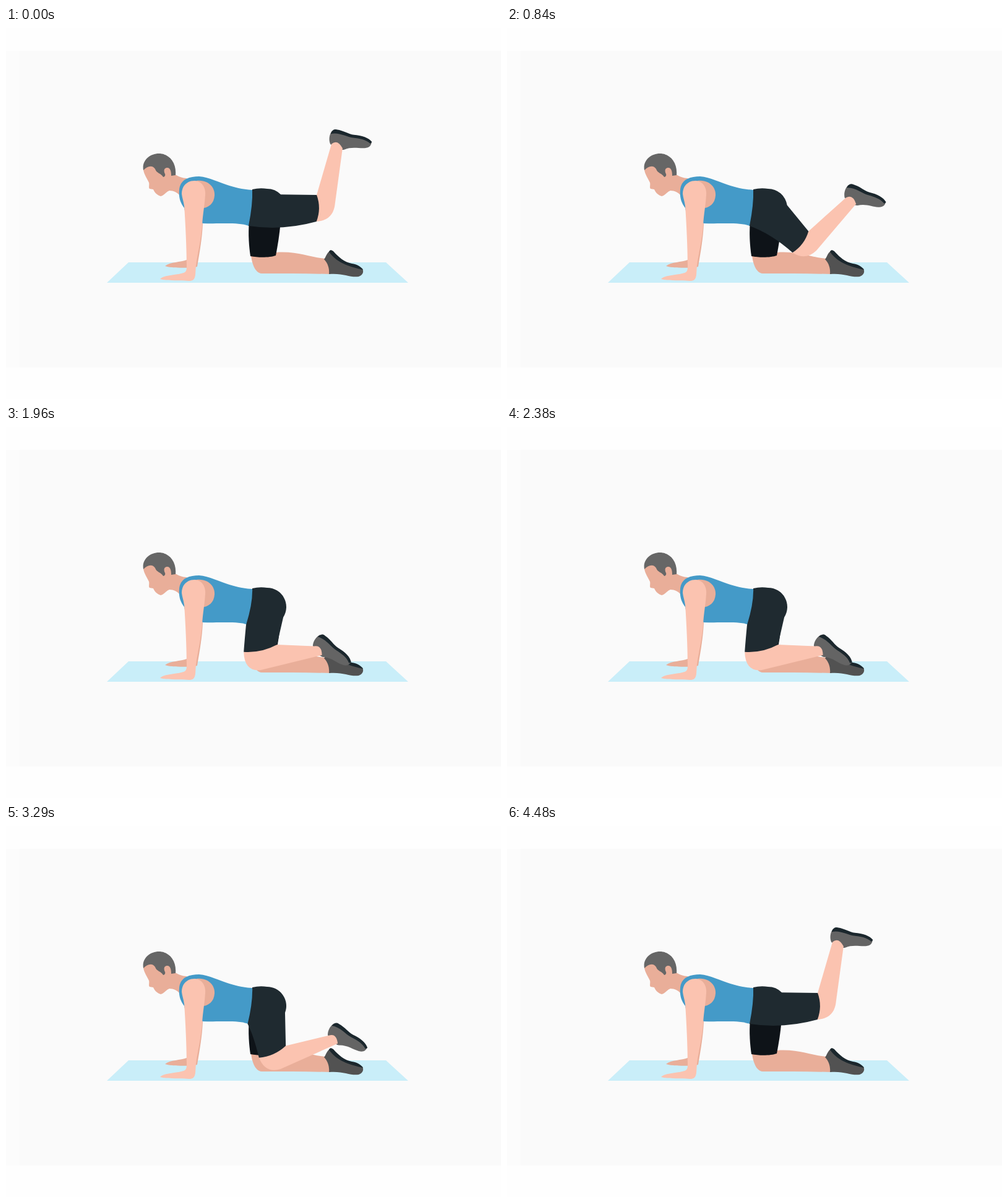
Recreate the animation shown at these times as an HTML page. Size 800 by 600 pixels, loop 4550 ms.

```html
<!DOCTYPE html>
<html lang="en">
<head>
<meta charset="utf-8">
<title>Kneeling leg raise</title>
<style>
  html, body { margin: 0; width: 100%; height: 100%; overflow: hidden; background: #fefefe; }
  svg { display: block; width: 800px; height: 600px; }
  .skin { fill: #fbc3b0; }
  .shade { fill: #e9ae99; }
  .shirt { fill: #449ac8; }
  .shorts { fill: #1f2a30; }
  .far-shorts { fill: #0e1318; }
  .sole { fill: #1b272d; }
</style>
</head>
<body>
<svg viewBox="0 0 800 600">
  <rect y="37" width="800" height="512" fill="#fcfcfc"/>
  <rect x="22" y="37" width="778" height="512" fill="#fafafa"/>
  <path fill="#c9eef9" d="M198 379H614L650 412H163Z"/>

  <!-- far arm -->
  <path class="shade" d="M257 385C265 378 283 379 292 375L300 316H318C317 340 313 362 309 386C297 389 264 388 257 385Z"/>

  <!-- head and neck -->
  <path class="shade" d="M222 229C223 237 228 243 231 250C232 254 230 258 232 260L238 261C240 266 244 270 250 272C256 271 258 265 264 263C271 263 277 266 282 272L300 260L292 243C285 243 278 240 272 236L262 222L238 216Z"/>
  <path fill="#666" d="M222 230C219 214 233 203 247 203C264 203 276 218 274 238L267 239C267 231 265 226 261 226C256 226 254 230 257 236C258 239 256 241 254 241C251 235 243 235 241 228C237 221 228 223 222 230Z"/>

  <!-- supporting leg -->
  <path class="shade" d="M396 368C398 383 403 396 413 397C450 397 490 397 525 398L520 373C495 373 473 360 436 363Z"/>
  <path class="far-shorts" d="M393 312C391 335 393 355 395 369C410 372 427 371 436 368C439 352 442 335 444 312Z"/>
  <path fill="#525252" d="M523 361C518 364 517 371 514 374C520 380 523 389 522 398C545 396 556 404 570 402C576 400 579 395 576 389C557 384 539 378 523 361Z"/>
  <path class="sole" d="M522 362C523 359 525 358 529 361C539 372 546 378 559 381C567 382 574 386 577 391C560 387 536 382 522 362Z"/>

  <!-- torso -->
  <path class="shirt" d="M288 291C281 282 279 273 280 262C281 246 294 240 312 240C337 242 355 259 398 262L400 290L392 320C375 314 350 317 318 316L290 300Z"/>
  <path class="shade" d="M308 247C326 245 338 257 337 271C336 284 328 291 314 292Z"/>

  <!-- near arm -->
  <path class="skin" d="M284 268C284 255 293 247 305 247C317 248 323 258 322 270C321 288 318 300 317 320C315 345 310 362 307 384L306 399C305 407 302 409 296 409C282 407 263 410 249 406C255 399 275 400 287 396C292 394 292 390 292 385C292 350 289 300 288 288C287 280 285 276 284 268Z"/>

  <!-- raised leg -->
  <g id="shoe">
    <path fill="#646464" d="M-1 1C-4 8 -3 16 1 22C12 28 20 28 25 26C36 18 48 19 57 16C64 14 67 9 65 3C45 2 20 0 -1 1Z"/>
    <path class="sole" d="M-2 6C-1 -1 2 -3 6 -3C18 -4 26 0 35 -1C47 -3 60 -2 66 4L64 7C55 2 45 3 35 4C24 5 10 0 -2 6Z"/>
  </g>
  <path id="shin" class="skin"/>
  <path id="thigh" class="shorts"/>
</svg>
<script>
  const FRAME = 70, LOOP = 4550, START = 70, SWING = 1600;
  const HIP = [405, 277], SEAT = [422, 291], SEAT_RADIUS = 31, SHIN = 106;

  const [shoe, shin, thigh] = ['shoe', 'shin', 'thigh'].map(id => document.getElementById(id));
  const rad = deg => deg * Math.PI / 180;

  // Point at a distance and direction (degrees) from another
  const polar = ([x, y], r, deg) => [x + r * Math.cos(rad(deg)), y + r * Math.sin(rad(deg))];
  const mid = (p, q) => [(p[0] + q[0]) / 2, (p[1] + q[1]) / 2];

  // fold runs from 0 (leg raised) to 1 (kneeling)
  function pose(fold) {
    const tuck = fold ** 6;
    const thighDeg = 8.5 + 77.2 * fold;
    const shinDeg = -78 + 68.4 * fold;
    const shoeDeg = 13 + 26 * fold ** 1.4;

    const hem = polar(HIP, 98 - 17 * tuck, thighDeg);
    const hemDeg = thighDeg - 8, hemHalf = 21.5 + 6 * tuck;
    const back = polar(hem, hemHalf, hemDeg - 90);
    const front = polar(hem, hemHalf, hemDeg + 90);
    const hemCurve = polar(hem, 8, hemDeg);

    const seat = polar(SEAT, SEAT_RADIUS, thighDeg - 53);
    const waist = [392 - 4 * tuck, 320];
    const [mx, my] = mid(front, waist);
    const groin = [mx, my + 13 * Math.cos(rad(3 * thighDeg))];

    const knee = polar(HIP, 109 - 8 * tuck, thighDeg + 7 * tuck);
    const ankle = polar(knee, SHIN, shinDeg);
    const calf = polar(polar(knee, 17, shinDeg + 90), 8, shinDeg);
    const kneecap = polar(knee, 23, thighDeg + 45);

    const fromAnkle = (x, y) => polar(polar(ankle, x, shoeDeg), y, shoeDeg + 90);
    const heel = fromAnkle(-12, -21.5);

    shoe.setAttribute('transform', `translate(${heel}) rotate(${shoeDeg})`);
    shin.setAttribute('d',
      `M${back}L${fromAnkle(-9, 0)}Q${fromAnkle(-1, -10)} ${fromAnkle(10, 3)}` +
      `L${calf}Q${kneecap} ${front}Z`);
    thigh.setAttribute('d',
      `M398 261Q410 258 422 260A${SEAT_RADIUS} ${SEAT_RADIUS} 0 0 1 ${seat}` +
      `L${back}Q${hemCurve} ${front}Q${groin} ${waist}Q399 285 398 261Z`);
  }

  const begin = performance.now();
  function tick() {
    const time = (performance.now() - begin) % LOOP;
    const t = Math.floor(time / FRAME) * FRAME;
    const swing = (Math.min(t, LOOP - t) - START) / SWING;
    pose((1 - Math.cos(Math.PI * Math.min(1, Math.max(0, swing)))) / 2);
    requestAnimationFrame(tick);
  }
  tick();
</script>
</body>
</html>
```
